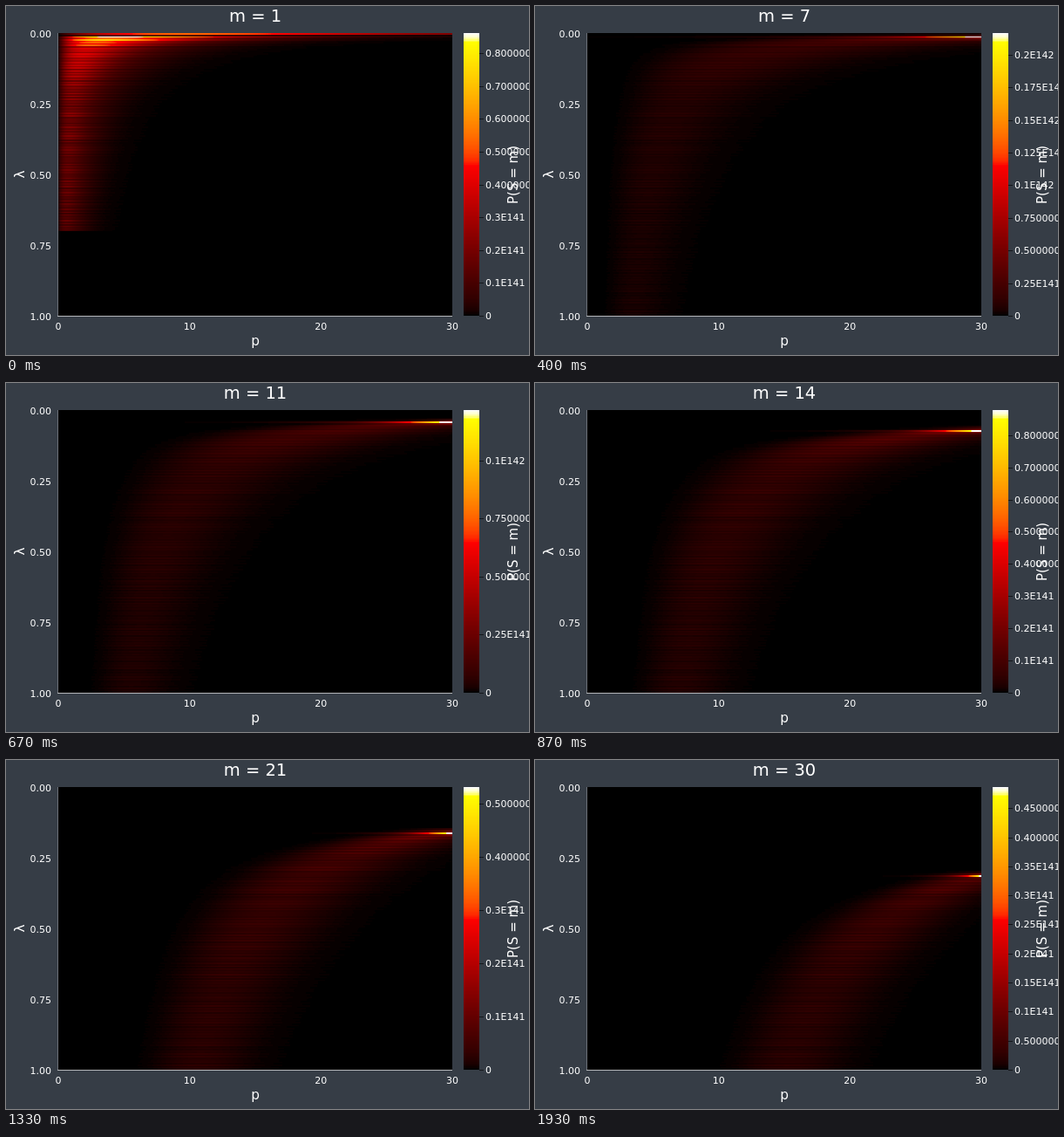
These frames come from a looping animation (600x400 px, 1990 ms). An HTML page with a canvas:

```html
<!DOCTYPE html>
<html lang="en">
<head>
<meta charset="utf-8">
<title>P(S = m)</title>
<style>
  html, body { margin: 0; width: 100%; height: 100%; overflow: hidden; background: #363d46; }
  canvas { display: block; }
</style>
</head>
<body>
<canvas id="stage" width="600" height="400"></canvas>
<script>
const ctx = document.getElementById('stage').getContext('2d');
const LOOP = 1990, STEPS = 30, ROWS = 200;
const X = 60, Y = 31, W = 452, H = 324;
const FONT = '"DejaVu Sans", Verdana, sans-serif';

const clamp = v => Math.max(0, Math.min(1, v));
const gamma = v => 255 * (v <= .0031308 ? 12.92 * v : 1.055 * v ** (1 / 2.4) - .055);

// Black, red, yellow, white with evenly rising lightness:
// each channel fills up with luminance before the next one starts
function fire(v) {
  const lum = v < .08 ? v / 9.033 : ((v + .16) / 1.16) ** 3;
  return [lum / .2126, (lum - .2126) / .7152, (lum - .9278) / .0722]
    .map(c => Math.round(gamma(clamp(c))));
}
const palette = Array.from({ length: 256 }, (_, i) => fire(i / 255));

// Fixed brightness of each row
const stripes = Array.from({ length: ROWS }, (_, i) => {
  const s = Math.abs(Math.sin((i + 1) * 12.9898) * 43758.5453) % 1;
  return (.7 + .4 * s) * (i % 2 ? .8 : 1.15);
});

// Top of the colour scale, in units of 1E141
function scaleMax(m) {
  if (m < 7) return .862 - .075 * (m - 1);
  const d = m - 20.5;
  return (11.15 + .0315 * d ** 2 + .0007 * d ** 3) / m;
}

// Row in which the band meets the right border
function edgeRow(m) {
  const x = m - 7;
  return 2 * Math.max(0, Math.round(1 + .75 * x + .024 * x * x));
}

// Returns the brightness along p for one row
function rowProfile(m, i) {
  const lambda = (i + .5) / ROWS, edge = edgeRow(m), gap = i - edge;
  if (lambda > .62 + .08 * m || gap < -3) return () => 0;

  const k = Math.min(1, edge / ROWS / lambda);
  const center = m / 2 / Math.sqrt(lambda) * (1 + .13 * k ** 3);
  const shape = m / (1 - .7 * k ** 1.2) ** 2;
  let level = .27 / Math.sqrt(lambda * 2 * Math.PI * m) / scaleMax(m) * stripes[i] * (1 + k ** 3);
  if (i < 2) level *= .2;
  if (i === 2 && m < 7) level = 1.05;
  if (gap < 0) level *= 1 + gap / 4;

  const glow = edge ? Math.exp(-2 * Math.abs(gap)) : 0;
  return p => level * (p / center) ** shape * Math.exp(shape * (1 - p / center))
    + glow * Math.exp((p - 30) * m / 36);
}

const map = ctx.createImageData(W, H);

function drawMap(m) {
  for (let y = 0, row = -1, value; y < H; y++) {
    const i = Math.floor(y * ROWS / H);
    if (i !== row) value = rowProfile(m, row = i);
    for (let x = 0; x < W; x++) {
      const v = clamp(value((x + .5) * 30 / W)), at = (y * W + x) * 4;
      map.data.set(palette[Math.round(v * 255)], at);
      map.data[at + 3] = 255;
    }
  }
  ctx.putImageData(map, X, Y);
}

function text(str, x, y, size = 11, align = 'center', angle = 0) {
  ctx.save();
  ctx.translate(x, y);
  ctx.rotate(angle);
  ctx.font = size + 'px ' + FONT;
  ctx.textAlign = align;
  ctx.fillStyle = '#fff';
  ctx.fillText(str, 0, 0);
  ctx.restore();
}

function tickLabel(v) {
  if (v === 0) return '0';
  if (v < .1) return (v * 10).toFixed(9) + 'E140';
  if (v >= 1) return +(v / 10).toFixed(4) + 'E142';
  return (v < .4 ? +v.toFixed(3) : v.toFixed(9)) + 'E141';
}

function drawColorbar(m) {
  for (let y = 0; y < H; y++) {
    ctx.fillStyle = `rgb(${palette[Math.round(255 * (1 - y / (H - 1)))]})`;
    ctx.fillRect(525, Y + y, 18, 1);
  }
  const max = scaleMax(m);
  const step = max < .5 ? .05 : max < 1 ? .1 : .25;
  for (let n = 0; n * step <= max; n++) {
    const v = +(n * step).toFixed(3), y = Y + H - H * v / max;
    ctx.fillStyle = '#14171b';
    ctx.fillRect(543, Math.round(y), 5, 1);
    text(tickLabel(v), 550, y + 4, 11, 'left');
  }
}

function draw(m) {
  ctx.fillStyle = '#363d46';
  ctx.fillRect(0, 0, 600, 400);
  drawMap(m);
  drawColorbar(m);
  ctx.fillStyle = '#6c7178';
  ctx.fillRect(59, Y, 1, H + 1);
  ctx.fillStyle = '#b4b6b9';
  ctx.fillRect(59, Y + H, W + 1, 1);
  for (let n = 0; n <= 4; n++) text((n / 4).toFixed(2), 52, 35.5 + n * H / 4, 11, 'right');
  for (let n = 0; n <= 3; n++) text(n * 10, X + n * W / 3, 371);
  text('m = ' + m, 286, 18, 19.5);
  text('p', 286, 389, 15.3);
  text('λ', 21, 193, 15.3, 'center', -Math.PI / 2);
  text('P(S = m)', 586.5, 193.5, 15, 'center', -Math.PI / 2);
}

// Steps start at multiples of 1/15 s, rounded to 10 ms
const startOf = n => Math.round(n * 20 / 3) * 10;
const begin = performance.now();
let shown = 0;

function tick() {
  const t = (performance.now() - begin) % LOOP;
  let m = 1;
  while (m < STEPS && startOf(m) <= t) m++;
  if (m !== shown) draw(shown = m);
  requestAnimationFrame(tick);
}
tick();
</script>
</body>
</html>
```
